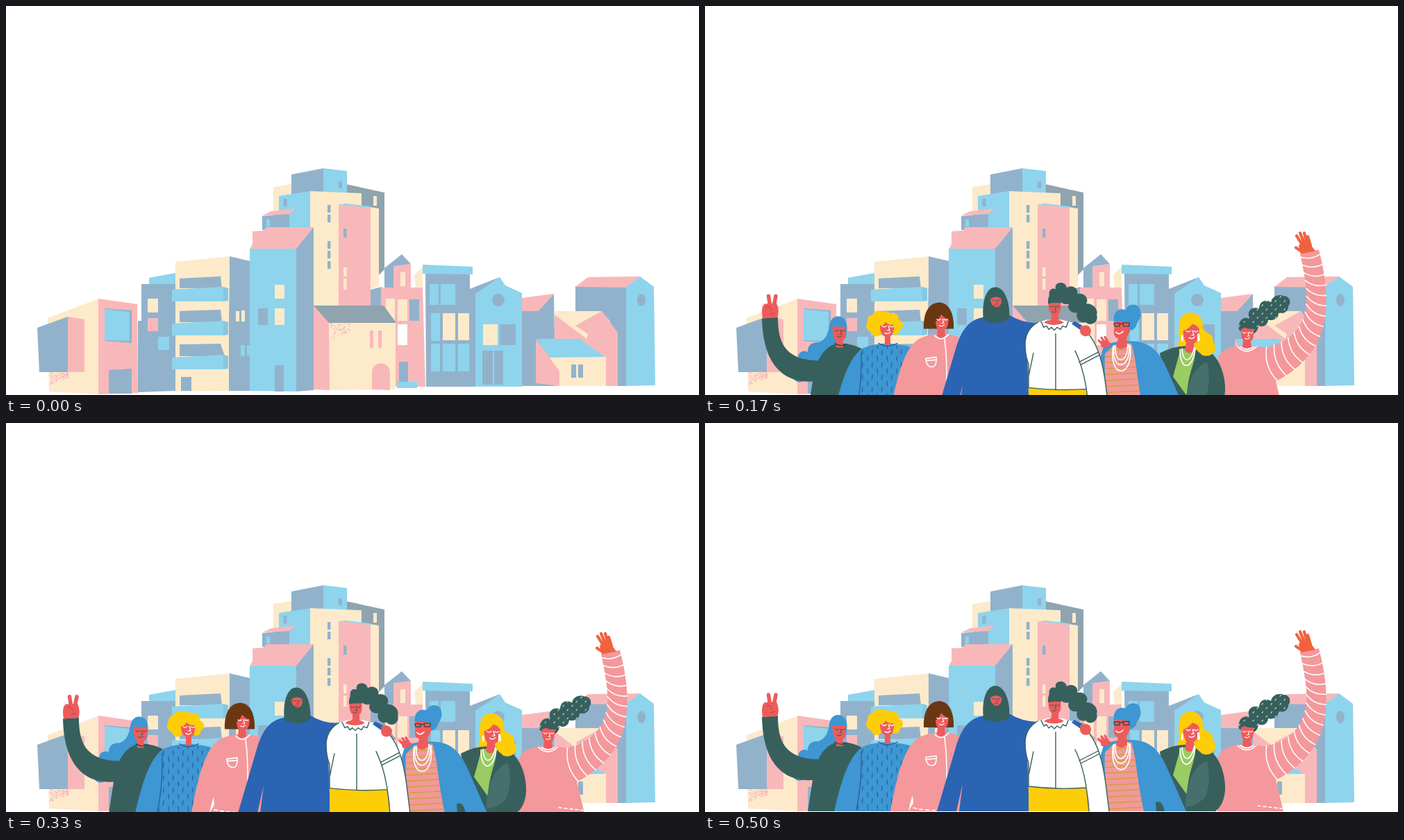
Write an HTML page that moves like this. It is 998 px wide and 561 px high and loops after 6510 ms.

```html
<!DOCTYPE html>
<html lang="en">
<head>
<meta charset="utf-8">
<title>City crowd</title>
<style>
html, body { margin: 0; width: 100%; height: 100%; overflow: hidden; background: #fff; }
svg { display: block; width: 100%; height: 100%; }
.s { fill: #8ed4ed; } .b { fill: #92b2cc; } .p { fill: #f8b8ba; } .c { fill: #fdeaca; } .g { fill: #8fa4ae; } .w { fill: #fff; }
.teal { fill: #37605d; } .blue { fill: #3e96d3; } .deep { fill: #2b64b3; } .pink { fill: #f4989b; }
.skin { fill: #ee5b5b; } .hand { fill: #f0623f; } .sun { fill: #fdcd08; } .brown { fill: #6b3712; } .lime { fill: #99cc62; }
.l { fill: none; stroke: #fff; stroke-width: 1.6; stroke-linecap: round; stroke-linejoin: round; }
.d { fill: none; stroke: #37605d; stroke-width: 1.4; stroke-linecap: round; stroke-linejoin: round; }
.n { fill: none; stroke: #23609f; stroke-width: 1.3; stroke-linecap: round; }
.finger { fill: none; stroke-linecap: round; stroke-linejoin: round; }
</style>
</head>
<body>
<svg viewBox="0 0 998 561" preserveAspectRatio="none">
<defs>
  <g id="face" fill="none" stroke-width="1.3" stroke-linecap="round">
    <path d="M-8-2q3 3 6 0M3-2q3 3 6 0M1-2l2 6-3 .5M-4 8q4 3 8-1"/>
  </g>
  <pattern id="wool" width="14" height="18" patternUnits="userSpaceOnUse">
    <path d="M3 2l-.6 6M10 11l.6 6" stroke="#23609f" stroke-width="1.3" stroke-linecap="round"/>
  </pattern>
  <pattern id="dots" width="13" height="12" patternUnits="userSpaceOnUse">
    <path d="M2 4l1.5-1.6M9 10l1.5-1.6" stroke="#d5e2df" stroke-width="1.1" stroke-linecap="round"/>
  </pattern>
  <pattern id="stripes" width="60" height="8.6" patternUnits="userSpaceOnUse" patternTransform="translate(575 467) rotate(-3)">
    <path d="M0 4H60" stroke="#c9a33f" stroke-width="1.6"/>
  </pattern>
  <path id="inner" d="M857 331C863 360 870 391 864 416C858 441 838 460 807 466"/>
  <path id="outer" d="M884 325C896 370 901 420 882 458C870 482 848 502 822 515"/>
  <path id="curl" d="M769 441C767 428 774 421 784 424C779 412 790 406 798 410C798 399 808 396 815 401C817 391 828 389 833 392C842 391 845 402 840 407C840 416 830 418 826 416C826 426 816 428 811 426C810 436 801 437 797 434C797 444 789 449 780 446z"/>
  <clipPath id="hem"><path d="M0 0H998V560.400H0z"/></clipPath>
</defs>

<g id="city">
  <!-- tower -->
  <path class="c" d="M385 261L411 257V290L385 296z"/>
  <path class="g" d="M490 257L545 269V380L525 400L490 300z"/>
  <path class="b" d="M411 243L457 234V268L411 272z"/>
  <path class="s" d="M457 234L491 238V270H457zM393 274L438 267V322H393z"/>
  <path class="b" d="M479 253h5v10h-5zM399.500 278h5v11h-5z"/>
  <path class="c" d="M529 274h5v14h-5z"/>
  <path class="b" d="M369 303L408 299V323H369z"/>
  <path class="s" d="M375 308h5v10h-5z"/>
  <path class="p" d="M369 302L382 296L417 292L408 300z"/>
  <path class="c" d="M438 267L512 270V288L537 292V404L525 408V432H438z"/>
  <path class="p" d="M479 286L525 291V433H479z"/>
  <path class="s" d="M479 286L490 285L525 289V291z"/>
  <path class="b" d="M463 287h4.500v11h-4.500zM463 301h4.500v11h-4.500zM463 339h4.500v11h-4.500zM463 353h4.500v11h-4.500zM463 368h4.500v11h-4.500zM486 321h4.500v13h-4.500z"/>
  <path class="c" d="M486 377h4.500v13h-4.500zM486 393h4.500v16h-4.500z"/>

  <!-- left blocks -->
  <path class="s" d="M206 392L244 385V403H206z"/>
  <path class="b" d="M195 401H245V555L190 557V454H195z"/>
  <path class="c" d="M204 422h15v20h-15z"/>
  <path class="p" d="M204 450h15v19h-15z"/>
  <path class="s" d="M219 477h16v19h-16z"/>
  <path class="b" d="M322 361L352 368V555H320z"/>
  <path class="c" d="M331 440h5v15h-5zM339 439h5v16h-5z"/>
  <path class="s" d="M338 489h6v16h-6zM347 489h4v15h-4z"/>
  <path class="c" d="M244 369L322 361V407H321V555L244 556z"/>
  <path class="b" d="M250 393L309 390L311 407H250zM250 440L309 438L311 456H250zM250 488L309 487L315 505H250zM252 535h15v20h-15z"/>
  <g id="balcony"><path class="s" d="M239 409L313 405V426H239z"/><path d="M313 405L320 407V425L313 426z" fill="#85c8e3"/></g>
  <use href="#balcony" y="49"/><use href="#balcony" y="98"/>

  <path class="p" d="M355 325L371 324L375 319H443L418 351H351L355 343z"/>
  <path class="s" d="M351 350H418V556L351 555z"/>
  <path class="b" d="M418 350L443 319V554L418 556zM363 436h14v24h-14zM387 518h13v38h-13z"/>
  <path class="c" d="M387 402h14v20h-14zM387 436h14v24h-14z"/>

  <path class="c" d="M60 450L134 422V560L62 556z"/>
  <path class="p" d="M133 422L189 430L190 558L133 560z"/>
  <path class="b" d="M142 436L181 439V486L142 483zM148 525L181 523V559H148z"/>
  <path class="s" d="M142 437L178 441V483L142 482z"/>
  <path class="b" d="M45 464L89 448V528H48z"/>
  <path class="p" d="M89 448L113 452V528H89z"/>

  <!-- middle houses -->
  <path class="b" d="M545 378L570 358L583 372L560 376V408H545zM525 409L541 405V434H525z"/>
  <path class="c" d="M588 388L600 376V407H590z"/>
  <path class="p" d="M558 375L583 372V406H600L604 549H556V457L540 432V406H558z"/>
  <path class="c" d="M568 384h7v20h-7zM547 422h13v30h-13zM564 423h14v31h-14z"/>
  <path class="w" d="M564 459h14v30h-14z"/>
  <path class="b" d="M581 423h14v31h-14zM566 513h13v30h-13z"/>
  <path class="s" d="M563 542h29v9h-29z"/>
  <path class="p" d="M443 432L466 456V554L443 553z"/>
  <path class="c" d="M465 456H561V553L466 554z"/>
  <path class="g" d="M443 432H544L562 457H465z"/>
  <path class="p" d="M524 468h5v25h-5zM536 468h5v25h-5zM527 553V528C527 511 553 511 553 528V554z"/>

  <!-- right houses -->
  <path class="b" d="M604 386H668V409L676 412V549L605 549zM668 408L711 391L676 417H668z"/>
  <path class="s" d="M600 373L672 376V387L600 386zM610 401h13v30h-13zM626 401h21v30h-21zM612 443h13v40h-13zM612 487h13v40h-13zM629 487h18v40h-18zM651 487h16v40h-16z"/>
  <path class="c" d="M629 443h18v39h-18zM651 443h16v39h-16z"/>
  <path class="s" d="M676 415L711 391L719 403L743 414V549H676z"/>
  <path class="b" d="M711 459h23v30h-23zM686 497h15v49h-15zM703 497h13v49h-13z"/>
  <circle class="b" cx="709" cy="424" r="9"/>
  <path class="c" d="M687 459h21v30h-21z"/>
  <path class="b" d="M743 440H766L789 415L791 548H743z"/>
  <path class="p" d="M743 421L789 415L766 440H743z"/>
  <path class="b" d="M820 404H894V548H870V455L858 441H820z"/>
  <path class="p" d="M820 405L838 391L913 390L893 406z"/>
  <path class="s" d="M893 405L913 390L933 405L935 547L893 548z"/>
  <ellipse class="b" cx="915" cy="424" rx="6" ry="9"/>
  <path class="c" d="M789 440H858L838 480H800z"/>
  <path class="p" d="M790 445L836 480L838 473L820 461L858 440L881 471V548H790z"/>
  <path class="s" d="M763 480H826L864 507H783z"/>
  <path class="p" d="M763 481L784 507H797V548L763 544z"/>
  <path class="c" d="M783 507L864 506V548H797V527z"/>
  <path class="b" d="M814 517h7v19h-7zM824 517h7v19h-7z"/>
  <path id="specks" class="p"/>
</g>

<g id="crowd"><g clip-path="url(#hem)">
  <!-- striped sleeve, waving -->
  <path class="pink" d="M738 483C742 469 758 464 780 463L807 466C838 460 858 441 864 416C870 391 863 360 857 331L884 325C896 370 901 420 882 458C870 482 848 502 822 515L833 560H738z"/>
  <path id="bands" class="l"/>
  <path class="l" d="M796 552L831 556" stroke-dasharray="4 4"/>
  <path class="hand" d="M858 331L855 319L860 313L869 313L879 327z"/>
  <path class="finger" stroke="#f0623f" stroke-width="4.200" d="M860 318L852 305M863 316L857 301M867 316L863 301M872 319L868 306M860 328L851 322"/>
  <use href="#curl" class="teal"/>
  <use href="#curl" fill="url(#dots)"/>
  <path class="skin" d="M772 438Q782 432 790 440Q791 453 786 457L787 465Q781 470 774 465L775 456Q771 449 772 438z"/>
  <path class="teal" d="M769 441Q771 428 783 430L793 438Q784 441 777 437z"/>
  <use href="#face" transform="translate(781 446) scale(.85)" stroke="#fff"/>
  <path class="l" d="M767 465Q780 478 794 465M771 465Q780 472 790 465"/>

  <!-- long fair hair, dark coat -->
  <path class="sun" d="M683 432C684 411 713 410 717 432C715 441 722 444 727 447C734 450 729 457 734 461C738 471 730 481 716 477H690C680 476 677 466 682 459C685 452 680 447 683 432z"/>
  <path class="teal" d="M655 474Q675 464 690 464L712 464C739 471 750 505 749 529C748 545 742 555 735 560H690L660 505z"/>
  <path class="sun" d="M706 455C722 452 734 462 734 468C732 480 720 479 716 477L706 468z"/>
  <path class="lime" d="M685 468L706 466C708 487 696 498 694 536L674 508z"/>
  <path d="M723 487C700 497 692 525 692 554Q707 553 720 540C728 522 726 500 723 487z" fill="#466f6d"/>
  <path class="skin" d="M689 435Q702 428 712 437Q712 457 704 460L705 470Q697 478 691 470L693 459Q687 450 689 435z"/>
  <path class="sun" d="M685 443C683 421 708 415 716 433L713 443Q711 434 702 432Q695 441 685 443z"/>
  <use href="#face" transform="translate(701 444)" stroke="#fff"/>
  <path class="l" d="M684 469C684 500 702 500 706 468M687 468C688 488 699 491 705 465"/>
  <path class="w" d="M709 446h3l1 10-4 1zM686 448h2.500v9h-2.500z"/>

  <!-- bun, glasses, open jacket -->
  <path class="blue" d="M574 465Q586 456 613 457C649 457 659 482 671 510L693 560H576L568 485z"/>
  <path id="vest" class="pink" d="M580 471L590 462L614 460C622 485 621 510 632 560H582Q574 510 576 475z"/>
  <path d="M580 471L590 462L614 460C622 485 621 510 632 560H582Q574 510 576 475z" fill="url(#stripes)"/>
  <path class="teal" d="M649 547Q658 542 662 560H650z"/>
  <path class="blue" d="M589 428C587 414 597 408 606 412C609 401 627 402 627 414C630 423 622 428 621 435Q616 444 608 440z"/>
  <path class="skin" d="M590 428Q602 421 612 429V442L607 452L608 464Q599 472 592 465L595 453Q588 452 589 442z"/>
  <path class="blue" d="M588 428Q598 418 613 424L613 431Q599 426 588 429z"/>
  <path class="d" d="M589 431h8v4.500h-7zM602 430.500h9v5h-8zM597 432h5" style="stroke:#284c4c"/>
  <path class="l" d="M592 444Q596 449 602 443M588 464C580 512 618 512 612 463M589 464C584 500 613 500 611 463M591 464C589 491 609 491 609 461"/>

  <!-- peace sign, wavy hair -->
  <g class="blue"><path d="M179 436C176 450 172 456 163 459C150 458 147 468 148 474C136 472 132 483 137 490L180 490L195 455z"/><circle cx="136" cy="506" r="10"/><circle cx="143" cy="480" r="9"/></g>
  <path class="teal" d="M82 424L105 422C105 456 113 484 163 485C172 467 184 459 198 460Q214 461 228 469L222 560H148L155 515C102 518 83 476 82 424z"/>
  <path class="skin" d="M83 424Q80 407 86 403L103 402Q108 413 104 423z"/>
  <path class="finger" stroke="#ee5b5b" stroke-width="5.500" d="M94 408L91.500 392M99 407L102 392M86 408L90 414"/>
  <path class="finger" stroke="#b93d48" d="M88 408Q94 405 96 412M94 418L100 416"/>
  <path class="blue" d="M178 446C178 428 183 421 192 421C203 422 207 433 203 450L198 458H180z"/>
  <path class="skin" d="M183 436H203Q204 454 198 457L199 466H189L189 457Q184 452 183 436z"/>
  <use href="#face" transform="translate(194 443) scale(.85)" stroke="#37605d"/>
  <path class="n" d="M187 460Q195 466 204 461" style="stroke:#284c4c"/>

  <!-- curly hair, blue knit -->
  <path class="blue" d="M186 560C194 525 205 482 227 467Q256 455 295 465L280 560z"/>
  <path d="M226 470Q258 457 293 467L276 560H219Q226 515 226 470z" fill="url(#wool)"/>
  <path class="n" d="M225 474Q226 520 218 558"/>
  <g class="sun" id="curls"></g>
  <path class="skin" d="M252 430Q263 423 272 430Q273 447 267 450V461Q263 466 259 461V450Q251 447 252 430z"/>
  <path class="sun" d="M248 434Q262 417 276 432Q266 436 260 429Q257 436 248 434z"/>
  <use href="#face" transform="translate(263 437)" stroke="#fff"/>
  <path class="n" d="M250 460Q263 468 277 460"/>

  <!-- bob, pink shirt -->
  <path class="pink" d="M267 560C274 520 286 459 314 451Q340 441 366 451L376 480V560z"/>
  <path class="w" d="M299 537L300 548L293 560Q295 548 299 537z"/>
  <path class="brown" d="M315 439C314 415 323 401 338 401C353 402 359 420 358 439z"/>
  <path class="skin" d="M332 420Q345 416 351 422Q351 438 345 440L346 449Q340 455 334 449L335 440Q331 433 332 420z"/>
  <path class="brown" d="M328 431Q330 415 340 414Q351 417 353 427Q344 423 340 418Q337 427 328 431z"/>
  <use href="#face" transform="translate(341 427) scale(.9)" stroke="#fff"/>
  <path class="l" d="M331 449Q340 459 351 447M345 453C349 485 349 525 346 554M318 482L333 480Q334 493 328 494Q319 495 318 482zM319 485L332 484"/>
  <path class="l" d="M300 555Q322 560 345 558" stroke-dasharray="5 4"/>

  <!-- headscarf, long robe -->
  <path class="deep" d="M402 422C377 426 368 445 361 468L334 560H362L371 520L366 560H467L464 478L478 431Q455 430 438 419z"/>
  <path class="teal" d="M401 426C398 400 405 379 418 379C432 379 440 402 438 425Q420 436 401 426z"/>
  <path class="skin" d="M411 396Q419 390 427 396Q428 406 420 408Q411 406 411 396z"/>
  <use href="#face" transform="translate(419 399) scale(.7)" stroke="#37605d"/>

  <!-- ponytail, white blouse -->
  <path class="teal" d="M496 393C494 384 499 379 505 382C502 371 519 369 521 380C528 374 539 381 536 389C545 386 554 395 549 403C559 402 567 412 564 419C568 430 554 437 548 429C540 432 533 424 536 416C526 417 521 409 524 403C517 405 511 401 510 395z"/>
  <path class="sun" d="M466 523H548L553 560H466z"/>
  <path class="w" d="M479 430Q462 440 461 460Q461 478 466 490V524Q508 529 549 526L556 560H582L577 520C572 480 562 446 533 431L514 426H492z"/>
  <path class="d" d="M479 430Q462 440 461 460Q461 478 466 490V524Q508 529 549 526M533 431C562 446 572 480 577 520L582 560M473 474L466 508M505 446V526M533 471Q547 500 551 540L553 560M539 487L566 473M541 491L568 477"/>
  <path class="deep" d="M532 428L543 434L541 441L528 432z"/>
  <path class="skin" d="M495 398Q504 392 512 398Q514 416 509 418V426L517 432Q504 441 487 433L499 425V418Q493 413 495 398z"/>
  <path class="teal" d="M494 403Q493 388 503 388Q514 389 513 402Q503 401 494 403z"/>
  <use href="#face" transform="translate(503 408) scale(.8)" stroke="#37605d"/>
  <path class="d" d="M484 429L488 437L492 435L495 440L499 437L503 441L507 437L512 440L515 435L520 437L523 429" style="fill:#fff"/>
  <path class="skin" d="M488 430Q504 437 517 430L512 427H493z"/>
  <circle class="skin" cx="548" cy="442" r="8"/>
  <path class="skin" d="M540 436l8-2 3 6-9 6z"/>
  <path class="skin" d="M571 466L569 457L576 455L585 460L580 466z"/>
  <path class="finger" stroke="#ee5b5b" stroke-width="3.200" d="M573 462L567 456M576 459L571 452M580 458L576 451"/>
</g></g>
</svg>
<script>
const $ = id => document.getElementById(id);

// Rounded hair from circles: x, y, radius
function blobs(id, list) {
  $(id).innerHTML = list.map(([x, y, r]) => `<circle cx="${x}" cy="${y}" r="${r}"/>`).join('');
}
blobs('curls', [[258, 430, 16], [242, 434, 10], [241, 426, 7], [249, 421, 8], [261, 420, 6], [271, 424, 8],
  [277, 434, 8], [274, 441, 7], [247, 442, 8]]);

// Curved bands between the two edges of the raised sleeve
function bands(count) {
  const at = (id, u) => $(id).getPointAtLength(u * $(id).getTotalLength());
  let d = '';
  for (let i = 0; i <= count; i++) {
    const u = .03 + .96 * i / count, a = at('inner', u), b = at('outer', u);
    const bend = .12, dx = b.x - a.x, dy = b.y - a.y;
    const x = (a.x + b.x) / 2 - dy * bend * 2, y = (a.y + b.y) / 2 + dx * bend * 2;
    d += `M${a.x} ${a.y}Q${x} ${y} ${b.x} ${b.y}`;
  }
  return d;
}
$('bands').setAttribute('d', bands(14));

let seed = 7;
const rnd = () => (seed = seed * 16807 % 2147483647) / 2147483647;
function spray(x, y, w, h, count) {
  let d = '';
  while (count--) {
    const u = rnd(), v = rnd() * (1 - u * .6);
    d += `M${(x + u * w).toFixed(1)} ${(y + v * h).toFixed(1)}h1.6v1.500h-1.6z`;
  }
  return d;
}
$('specks').setAttribute('d', spray(62, 528, 28, 18, 80) + spray(466, 457, 28, 26, 60));

// Rise with an exponential ease-out in 15 steps over half a second
const LOOP = 6510, STEPS = 15, RISE = 266;
const start = performance.now();
function draw(now) {
  const t = Math.max(0, now - start) % LOOP;
  let n = 0;
  while (n < STEPS && Math.round((n + 1) * 10 / 3) * 10 <= t) n++;
  const y = n < STEPS ? RISE * 2 ** (-10 * n / STEPS) : 0;
  $('crowd').setAttribute('transform', `translate(0 ${y.toFixed(2)})`);
  requestAnimationFrame(draw);
}
draw(start);
</script>
</body>
</html>
```
